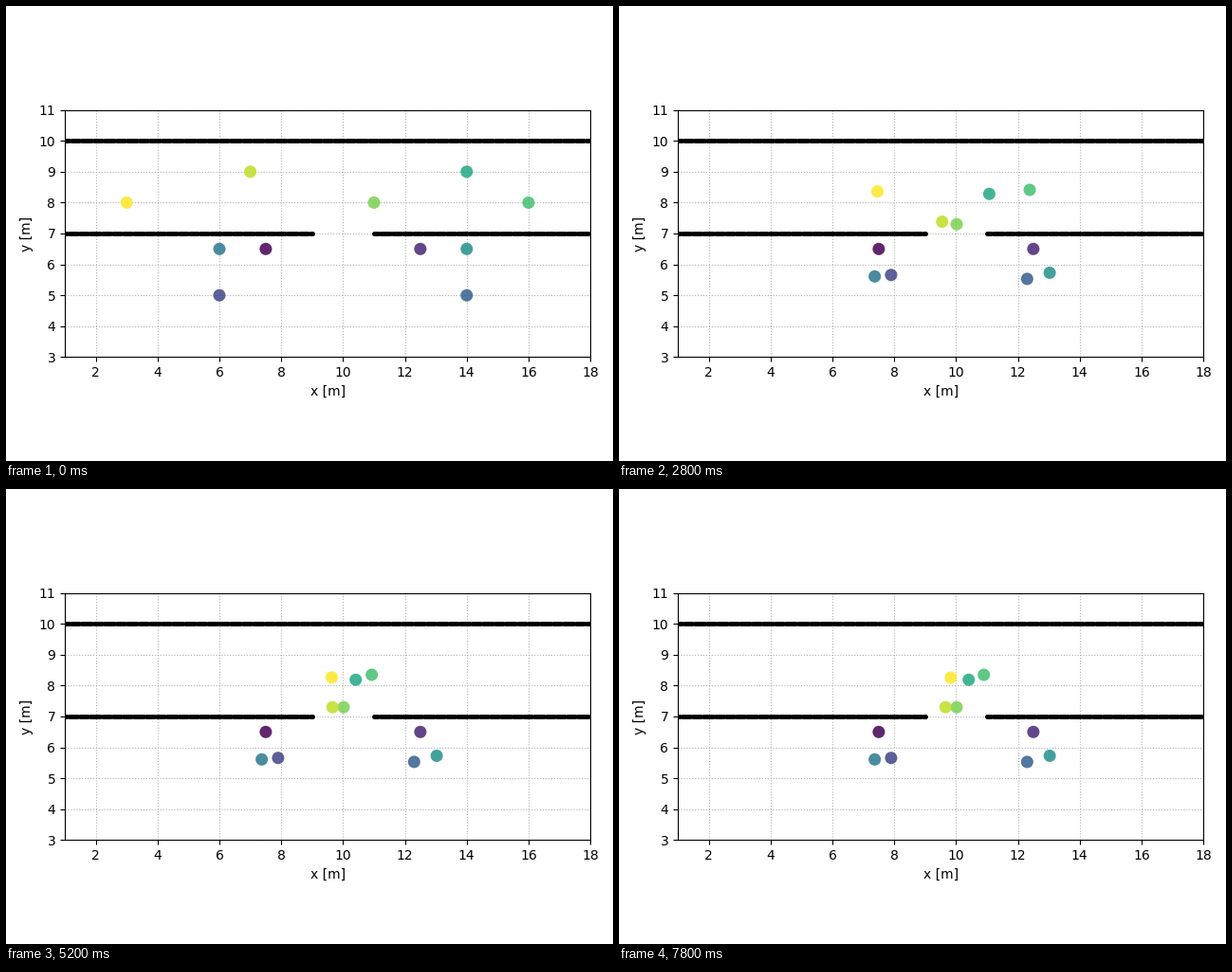
Write a matplotlib script that moves like this. It is 640 px wide and 480 px high and loops after 8000 ms.

```python
import math
import numpy as np
import matplotlib.pyplot as plt
from matplotlib.animation import FuncAnimation
from matplotlib.patches import Circle

STEP = 0.2      # seconds of walking per frame
FRAMES = 40
RADIUS = 0.2
STILL = (0, 0)


class Walker:
    """Walks to `via` in one second, slows into `stop`, then is jostled along `push`."""

    def __init__(self, start, via=None, stop=None, arrive=2.8, push=STILL):
        via = via or start
        self.start, self.via, self.stop, self.push = map(
            np.array, (start, via, stop or via, push))
        self.arrive = arrive

    def at(self, t):
        if t <= 1:
            return self.start + (self.via - self.start) * t
        u = min((t - 1) / (self.arrive - 1), 1)
        eased = 1 - (1 - u) ** 1.8
        sway = math.cos(2 * math.pi * (t - 2.75) / 2.5) * min(t - 1, 1)
        return self.via + (self.stop - self.via) * eased + self.push * sway


def wall(ax, x0, x1, y, density=15):
    xs = np.linspace(x0, x1, int((x1 - x0) * density))
    ax.plot(xs, np.full_like(xs, y), "-o", color="black", markersize=2.5)


# Ordered along the colour map, dark to light.
walkers = [
    Walker((7.5, 6.5)),
    Walker((12.5, 6.5)),
    Walker((6, 5), (7.31, 5.48), (7.78, 5.5), push=(0.12, 0.16)),
    Walker((14, 5), (12.69, 5.59), (12.2, 5.64), push=(0.1, -0.11)),
    Walker((6, 6.5), (6.55, 5.61), (7.27, 5.76), push=(0.1, -0.15)),
    Walker((14, 6.5), (13.35, 5.61), (12.98, 5.65), push=(0.05, 0.08)),
    Walker((14, 9), (12.79, 8.4), (10.35, 8.06), 4.5, (0.06, 0.13)),
    Walker((16, 8), (14.57, 8.41), (10.85, 8.25), 5.5, (0.05, 0.1)),
    Walker((11, 8), (10.02, 7.3)),
    Walker((7, 9), (8.34, 8.3), (9.66, 7.3), 3.4),
    Walker((3, 8), (4.53, 8.41), (9.83, 8.18), 6, (0, 0.08)),
]

fig, ax = plt.subplots(figsize=(6.4, 4.8), dpi=100)
ax.set(xlim=(1, 18), ylim=(3, 11), xlabel="x [m]", ylabel="y [m]",
       xticks=range(2, 19, 2), yticks=range(3, 12))
ax.set_aspect("equal")
ax.grid(linestyle="dotted")
ax.set_axisbelow(True)

wall(ax, 0, 20, 10)
wall(ax, 0, 9, 7)
wall(ax, 11, 20, 7)

colors = plt.get_cmap("viridis")(np.linspace(0, 1, len(walkers)))
dots = [ax.add_patch(Circle(w.start, RADIUS, facecolor=c, alpha=0.85, linewidth=0))
        for w, c in zip(walkers, colors)]

fig.tight_layout()
fig.subplots_adjust(bottom=0, top=1)


def update(n):
    for walker, dot in zip(walkers, dots):
        dot.center = walker.at(n * STEP)
    return dots


anim = FuncAnimation(fig, update, frames=FRAMES, interval=1000 * STEP, repeat=True)
plt.show()
```
